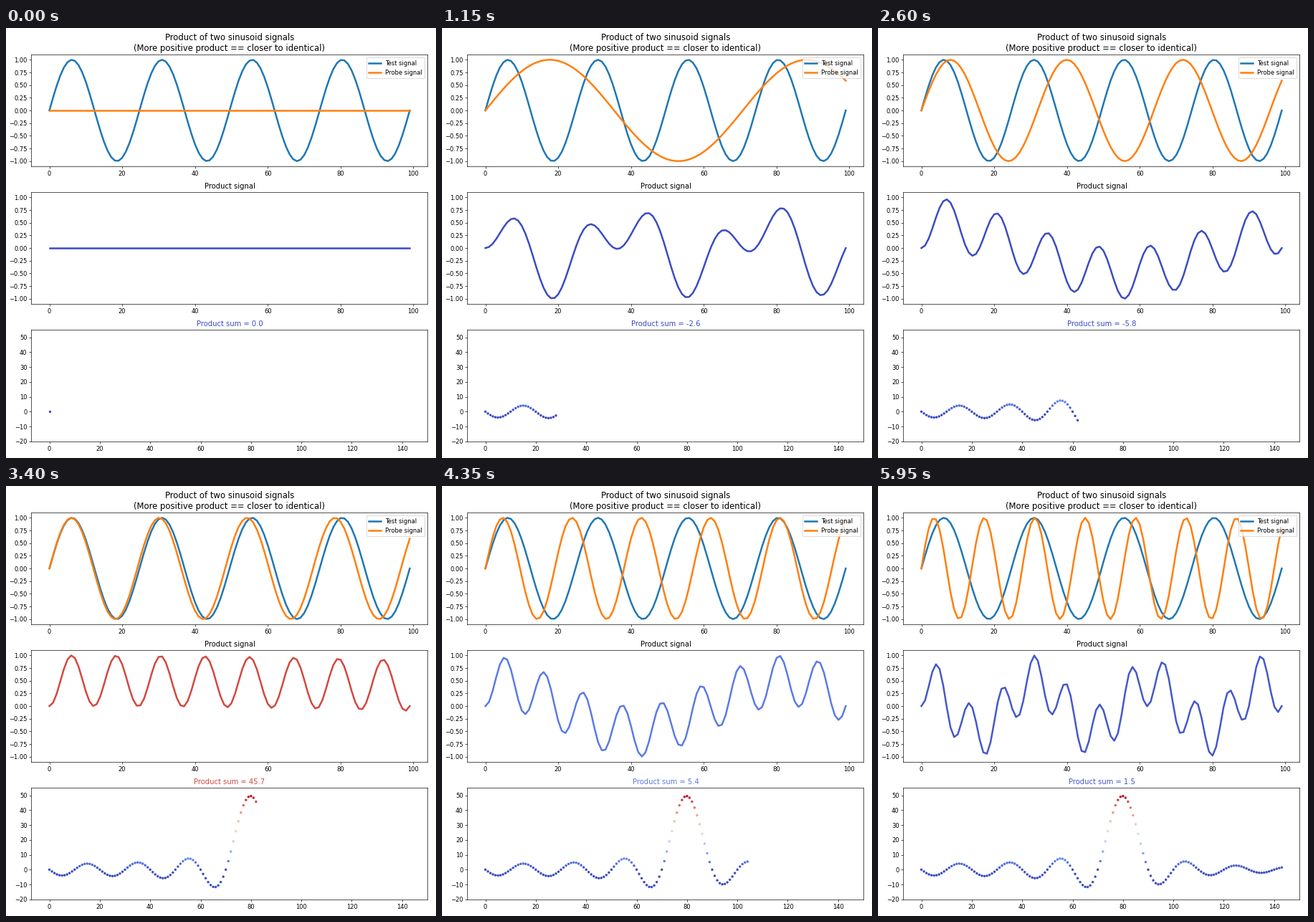
Write a matplotlib script that moves like this. It is 600x600 px and loops after 6 s.

```python
import numpy as np
import matplotlib.pyplot as plt
from matplotlib.animation import FuncAnimation

plt.rcParams["font.family"] = "DejaVu Sans"

FRAMES, INTERVAL = 120, 50
STEPS = 144          # probe frequencies swept during one loop
SAMPLES = 100
PEAK = 50            # product sum at the warm end of the colour map

t = np.linspace(0, 1, SAMPLES)
x = np.arange(SAMPLES)
test = np.sin(2 * np.pi * 4 * t)
steps = np.arange(STEPS)
probes = np.sin(2 * np.pi * np.outer(steps / 20, t))
products = probes * test
sums = products.sum(axis=1)
colors = plt.cm.coolwarm(np.clip(sums / PEAK, 0, 1))

fig, (ax_in, ax_prod, ax_sum) = plt.subplots(3, 1, figsize=(10, 10), dpi=60)
fig.subplots_adjust(left=35.4 / 600, right=588.5 / 600, top=1 - 37.3 / 600,
                    bottom=1 - 576.8 / 600, hspace=36.5 / 155.5)

ax_in.plot(x, test, lw=3, color="C0", label="Test signal")
probe_line, = ax_in.plot(x, probes[0], lw=3, color="C1", label="Probe signal")
ax_in.set_title("Product of two sinusoid signals\n"
                "(More positive product == closer to identical)", fontsize=14)
ax_in.legend(loc="upper right")

prod_line, = ax_prod.plot(x, products[0], lw=3)
ax_prod.set_title("Product signal", fontsize=12)

for ax in (ax_in, ax_prod):
    ax.set_xlim(-4.95, 103.95)
    ax.set_ylim(-1.1, 1.1)
    ax.set_yticks(np.arange(-1, 1.01, 0.25))

dots = ax_sum.scatter([], [], s=17, linewidths=0)
sum_title = ax_sum.set_title("", fontsize=12)
ax_sum.set_xlim(-7.15, 150.15)
ax_sum.set_ylim(-20, 55)


def update(frame):
    k = round(frame * STEPS / FRAMES)
    probe_line.set_ydata(probes[k])
    prod_line.set_ydata(products[k])
    prod_line.set_color(colors[k])
    dots.set_offsets(np.column_stack((steps, sums))[:k + 1])
    dots.set_facecolor(colors[:k + 1])
    sum_title.set_text(f"Product sum = {sums[k]:.1f}")
    sum_title.set_color(colors[k])
    return probe_line, prod_line, dots, sum_title


anim = FuncAnimation(fig, update, frames=FRAMES, interval=INTERVAL,
                     repeat=True, repeat_delay=0)
plt.show()
```
